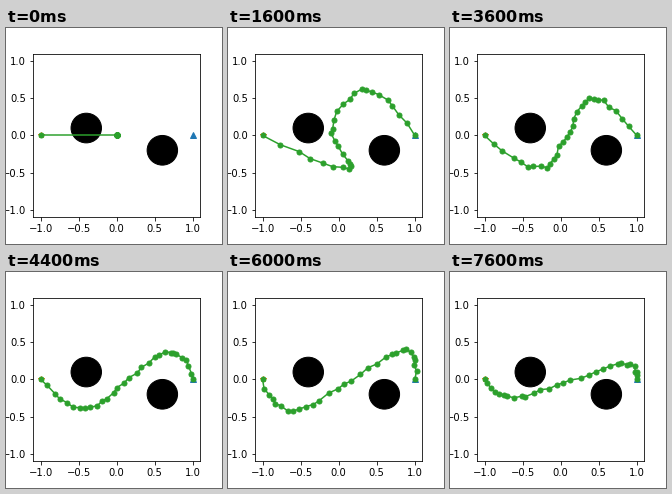
These frames come from a looping animation (216x216 px, 8000 ms). A matplotlib script:

```python
import numpy as np
import matplotlib.pyplot as plt
from matplotlib.animation import FuncAnimation

FRAMES, INTERVAL = 20, 400
STEPS = 30
START, GOAL = np.array([-1.0, 0.0]), np.array([1.0, 0.0])
OBSTACLES = [(-0.4, 0.1), (0.6, -0.2)]
RADIUS = 0.2
ROUGHNESS = 0.014

# Iteration, then the lowest and the highest turning point of the path.
TURNS = np.array([
    (1, -.50, -.06, .50, 0),
    (3, 0, -.94, .40, .63),
    (4, .15, -.46, .35, .62),
    (5, 0, -.70, .45, .79),
    (7, -.33, -.65, .58, .50),
    (9, -.24, -.45, .42, .50),
    (10, -.32, -.42, .55, .66),
    (11, -.40, -.39, .68, .38),
    (15, -.59, -.43, .83, .39),
    (19, -.60, -.24, .80, .20),
])


def spline(points, t):
    """Cubic Hermite curve through evenly spaced points, t in 0..1."""
    slopes = np.gradient(points, axis=0, edge_order=2)
    t = t * (len(points) - 1)
    i = np.minimum(t.astype(int), len(points) - 2)
    u = (t - i)[:, None]
    ease = u * u * (3 - 2 * u)
    return ((1 - ease) * points[i] + ease * points[i + 1]
            + u * (1 - u) ** 2 * slopes[i]
            - u * u * (1 - u) * slopes[i + 1])


def path_at(frame):
    if frame == 0:  # every step but the first rests at the centre
        return np.vstack([START, np.zeros((STEPS - 1, 2))])
    turns = [np.interp(frame, TURNS[:, 0], column) for column in TURNS.T[1:]]
    low, high = np.array(turns[:2]), np.array(turns[2:])
    # Early paths double back between the obstacles.
    middle = (low + high) / 2 - [max(0, 0.07 * (9 - frame)), 0]
    path = spline(np.array([START, low, middle, high, GOAL]),
                  np.linspace(0, 1, STEPS))
    noise = np.random.default_rng(frame).normal(0, ROUGHNESS, (STEPS - 2, 2))
    path[1:-1] += noise
    return path


plt.rcParams.update({"font.family": "DejaVu Sans", "font.size": 10})
fig, ax = plt.subplots(figsize=(3, 3), dpi=72)
fig.subplots_adjust(left=0.125, right=0.9, bottom=0.125, top=0.88)
ax.set(xlim=(-1.1, 1.1), ylim=(-1.1, 1.1))
ticks = np.arange(-1, 1.1, 0.5)
ax.set_xticks(ticks)
ax.set_yticks(ticks)

for center in OBSTACLES:
    ax.add_patch(plt.Circle(center, RADIUS, color="black"))
ax.plot(*GOAL, "^", color="C0")
ax.plot(*START, "*", color="C1")
line, = ax.plot([], [], "o-", color="C2", markersize=5)


def update(frame):
    line.set_data(*path_at(frame).T)
    return line,


anim = FuncAnimation(fig, update, frames=FRAMES, interval=INTERVAL,
                     repeat=True, repeat_delay=0)
plt.show()
```
